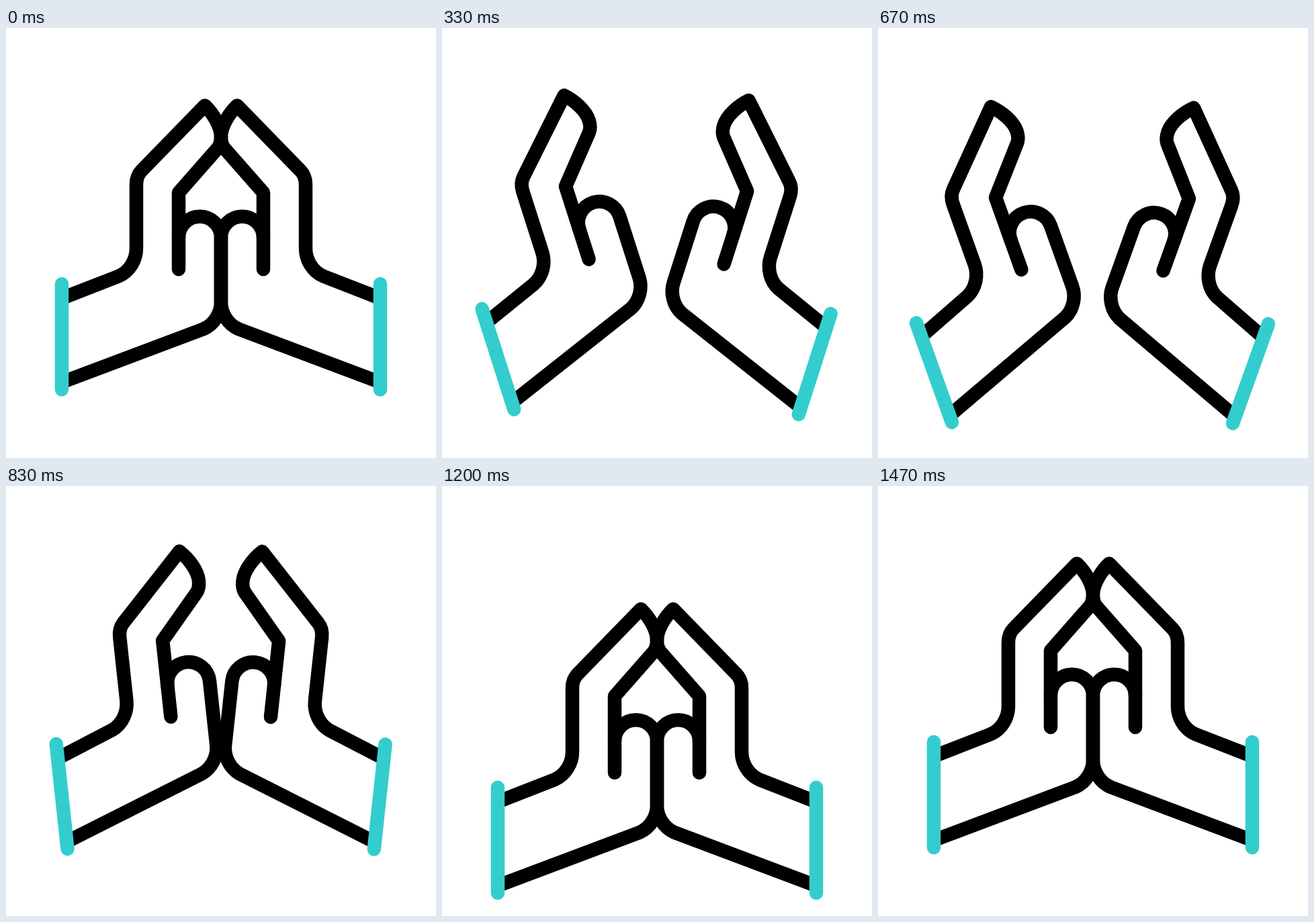
An HTML page with a canvas that plays this animation: 640 px wide and 640 px high, repeating every 1.67 s.

```html
<!DOCTYPE html>
<html lang="en">
<head>
<meta charset="utf-8">
<title>Hands</title>
<style>
html, body { margin: 0; width: 100%; height: 100%; overflow: hidden; background: #fff; }
canvas { display: block; width: 100vw; height: 100vh; object-fit: contain; }
</style>
</head>
<body>
<canvas id="stage" width="640" height="640"></canvas>
<script>
const ctx = document.getElementById("stage").getContext("2d");
const LOOP = 1670;
const STEP = 100 / 3;

// Left hand at rest; the right hand is its mirror image.
const palm = new Path2D(
  "M88 400.4 L168 369.2 C184 362 194 345 194 328 V233 C194 225 197 217 202 212 " +
  "L296 115.5 C309 128 320 147 320 162 C320 168 319 174 315 179 L257 245 V359");
const thumb = new Path2D(
  "M257 312 A31.5 31.5 0 0 1 320 312 V408 C320 424 310 441 294 448 L88 525.5");
const cuff = new Path2D("M83 381 V538");

// Keys are [step, value] pairs.
const tilt = [[1, 0], [12.4, 20], [19.35, 20], [28.3, 0]];
const settle = [[34.4, 72], [34.6, 72], [44, 0]];
const hands = [
  { mirrored: false, pivotY: 458,
    drop: [[4.8, 0], [16.2, 77], [17.2, 77], [24.7, 2.4], ...settle] },
  { mirrored: true, pivotY: 452,
    drop: [[4.05, 0], [15.45, 77], [17.4, 77], [24.7, 2.8], ...settle] }
];

const smooth = p => p * p * (3 - 2 * p);

function valueAt(keys, step) {
  if (step <= keys[0][0]) return keys[0][1];
  for (let i = 1; i < keys.length; i++) {
    const [start, from] = keys[i - 1];
    const [end, to] = keys[i];
    if (step < end) return from + (to - from) * smooth((step - start) / (end - start));
  }
  return keys[keys.length - 1][1];
}

function drawHand({ mirrored, pivotY, drop }, step) {
  ctx.save();
  if (mirrored) {
    ctx.translate(640, 0);
    ctx.scale(-1, 1);
  }
  ctx.translate(83, pivotY + valueAt(drop, step));
  ctx.rotate(-valueAt(tilt, step) * Math.PI / 180);
  ctx.translate(-83, -pivotY);
  ctx.strokeStyle = "#000";
  ctx.stroke(palm);
  ctx.stroke(thumb);
  ctx.strokeStyle = "#33cdcd";
  ctx.stroke(cuff);
  ctx.restore();
}

function draw(now) {
  const time = Math.floor((now % LOOP) / 10) * 10;
  const step = Math.floor((time + 5) / STEP);
  ctx.fillStyle = "#fff";
  ctx.fillRect(0, 0, 640, 640);
  ctx.lineWidth = 20.5;
  ctx.lineCap = ctx.lineJoin = "round";
  for (const hand of hands) drawHand(hand, step);
}

const begin = performance.now();
function tick() {
  draw(performance.now() - begin);
  requestAnimationFrame(tick);
}
tick();
</script>
</body>
</html>
```
